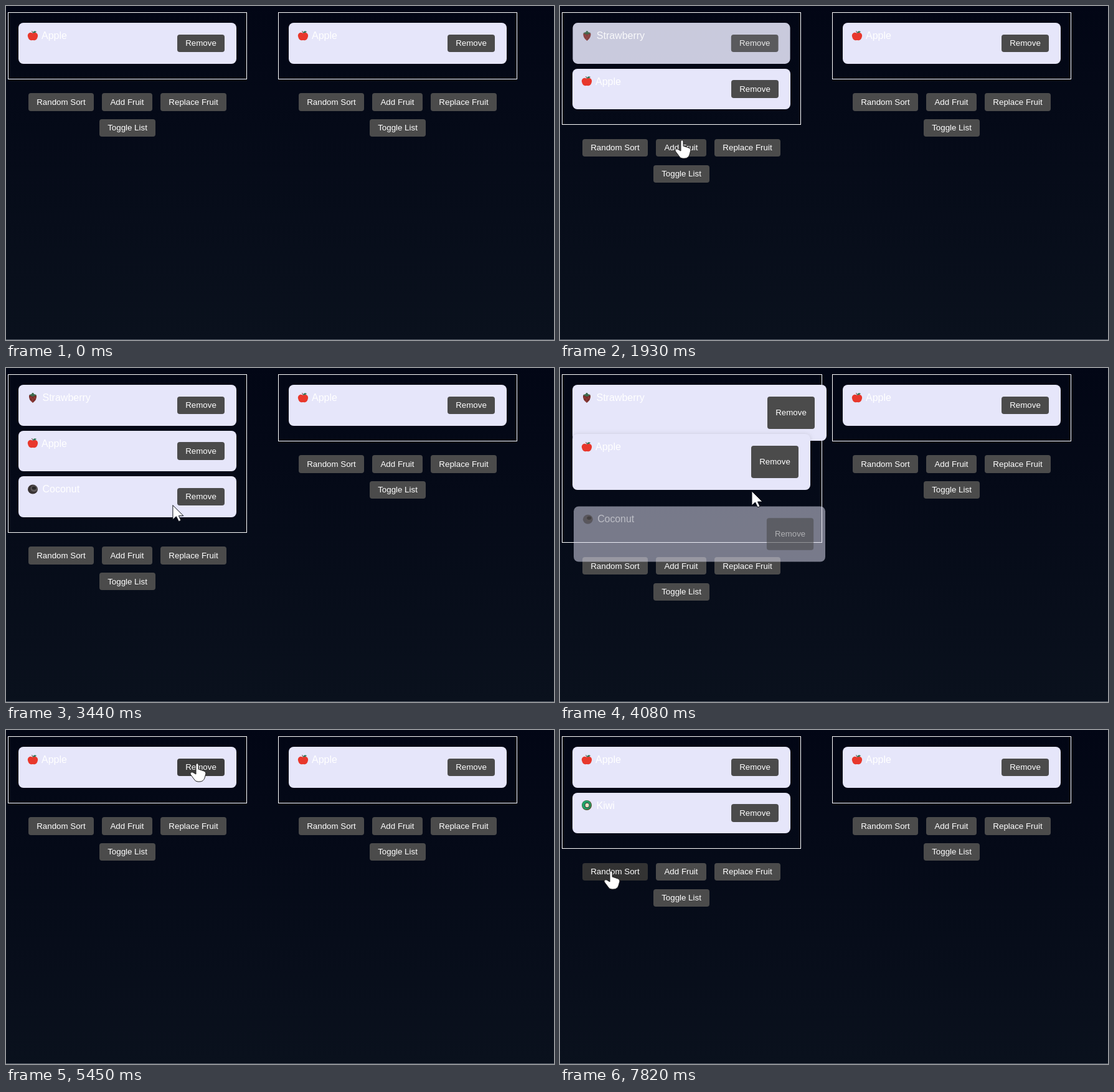
These frames come from a looping animation (880x537 px, 8 s). An HTML page with a canvas:

```html
<!DOCTYPE html>
<html lang="en">
<head>
<meta charset="utf-8">
<title>Animated fruit list</title>
<style>
  html, body { margin: 0; width: 100%; height: 100%; overflow: hidden; background: #050b17; }
  canvas { display: block; }
</style>
</head>
<body>
<canvas width="880" height="537"></canvas>
<script>
const ctx = document.querySelector('canvas').getContext('2d');
const LOOP = 8000, MOVE = 250, FADE_IN = 375;
const FONT = '"Liberation Sans", Arial, sans-serif';
const ITEM_H = 65.6, GROWN_H = 89.6, GAP = 8, FIRST_Y = 27;

// List contents after each change; "still" names an item that keeps its full width.
const steps = [
  { at: 0, list: ['Apple'] },
  { at: 1570, list: ['Strawberry', 'Apple'] },
  { at: 2510, list: ['Strawberry', 'Apple', 'Coconut'] },
  { at: 3997, list: ['Strawberry', 'Apple'], still: 'Strawberry' },
  { at: 5110, list: ['Apple'] },
  { at: 6200, list: ['Apple', 'Kiwi'] }
];
const presses = [[1460, 1570], [2390, 2510], [3930, 3997], [4960, 5110], [6090, 6200]];

// Pointer stops: time, x, y
const route = [
  [0, 797, 560], [70, 797, 537], [480, 420, 300], [780, 152, 160], [870, 164, 144],
  [1000, 177, 155], [1640, 177, 155], [1900, 193, 206], [1930, 196, 215], [2210, 190, 226],
  [2600, 190, 226], [2750, 184, 232], [3020, 186, 253], [3090, 186, 253], [3600, 305, 206],
  [3790, 308, 198], [4250, 308, 198], [4650, 307, 53], [5590, 307, 53], [5950, 200, 150],
  [6220, 200, 150], [6350, 206, 200], [6600, 205, 228], [6900, 205, 228], [7180, 300, 234],
  [7250, 300, 234], [7700, 95, 228], [7820, 82, 226], [LOOP, 82, 226]
];

const lerp = (a, b, p) => a + (b - a) * p;

// cubic-bezier(x1, 0, x2, 1)
const bezier = (x1, x2) => t => {
  if (t >= 1) return 1;
  let low = 0, high = 1;
  for (let i = 0; i < 20; i++) {
    const u = (low + high) / 2, v = 1 - u;
    if (3 * x1 * u * v * v + 3 * x2 * u * u * v + u ** 3 < t) low = u; else high = u;
  }
  return low * low * (3 - 2 * low);
};
const easeIn = bezier(.42, 1), easeOut = bezier(0, .58), easeInOut = bezier(.42, .58);

function pointerAt(t) {
  const i = Math.max(1, route.findIndex(stop => stop[0] >= t));
  const [t0, x0, y0] = route[i - 1], [t1, x1, y1] = route[i];
  const p = (t - t0) / (t1 - t0);
  return { x: lerp(x0, x1, p), y: lerp(y0, y1, p) };
}

const restY = index => FIRST_Y + index * (ITEM_H + GAP);
const restHeight = count => 34 + count * (ITEM_H + GAP);

function layoutAt(t) {
  const current = steps.findLastIndex(step => step.at <= t);
  const { at, list, still } = steps[Math.max(0, current)];
  const before = current > 0 ? steps[current - 1].list : list;
  const age = t - at, moving = current > 0 && age < MOVE;
  const p = moving ? easeInOut(age / MOVE) : 1;
  let flowY = FIRST_Y;

  const items = list.map((name, index) => {
    const item = { name, y: restY(index), w: 350, h: ITEM_H, alpha: 1, scale: 1 };
    const isNew = !before.includes(name);
    if (moving) {
      item.h = isNew ? ITEM_H : GROWN_H;
      item.w = isNew ? 384 : name === still ? 408 : lerp(374, 408, p);
      item.y = isNew ? flowY : lerp(restY(before.indexOf(name)), flowY, p);
      flowY += item.h + GAP;
    }
    if (isNew) {
      item.alpha = Math.max(0, 2 * easeIn(age / FADE_IN) - 1);
      item.scale = .98 + .02 * item.alpha;
    }
    return item;
  });

  const leaving = moving ? before.filter(name => !list.includes(name)) : [];
  for (const name of leaving) {
    const gone = easeOut(age / MOVE);
    const y = FIRST_Y + before.indexOf(name) * (GROWN_H + GAP);
    items.push({ name, y, w: 408, h: GROWN_H, alpha: 1 - gone, scale: 1 - .02 * gone, leaving: true });
  }

  const height = lerp(restHeight(before.length), restHeight(list.length), p) + (moving ? 34 : 0);
  const y = 10 + height + 22.6;
  const controls = [
    { label: 'Random Sort', x: 36, y, w: 105 },
    { label: 'Add Fruit', x: 154, y, w: 81 },
    { label: 'Replace Fruit', x: 248, y, w: 106 },
    { label: 'Toggle List', x: 150, y: y + 41.7, w: 90 }
  ].map(button => ({ ...button, id: button.label, h: 28.4 }));
  for (const item of items)
    item.button = { id: item.name, label: 'Remove', x: item.w - 75, y: item.y + 18.6, w: 76, h: item.h - 37.2 };
  return { items, controls, height, width: moving ? 418 : 384 };
}

function buttonUnderPointer(t) {
  const { x, y } = pointerAt(t), { items, controls } = layoutAt(t);
  const active = items.filter(item => !item.leaving).map(item => item.button);
  return [...controls, ...active]
    .find(b => x >= b.x && x < b.x + b.w && y >= b.y && y < b.y + b.h)?.id;
}

// Share of the last 200 ms spent over each button, for the colour fade.
function hoverAt(t) {
  const hover = {};
  for (let k = 0; k < 5; k++) {
    const id = buttonUnderPointer(Math.max(0, t - k * 40));
    if (id) hover[id] = (hover[id] || 0) + .2;
  }
  return hover;
}

function box(x, y, w, h, radius, color) {
  const left = Math.round(x), top = Math.round(y);
  ctx.fillStyle = color;
  ctx.beginPath();
  ctx.roundRect(left, top, Math.round(x + w) - left, Math.round(y + h) - top, radius);
  ctx.fill();
}

function text(value, x, y, size, align = 'left') {
  ctx.font = `${size}px ${FONT}`;
  ctx.textAlign = align;
  ctx.fillStyle = '#fff';
  ctx.fillText(value, x, y);
}

function ellipse(x, y, rx, ry, color) {
  ctx.fillStyle = color;
  ctx.beginPath();
  ctx.ellipse(x, y, rx, ry, 0, 0, 7);
  ctx.fill();
}

function shape(path, color, outline) {
  const p = new Path2D(path);
  ctx.fillStyle = color;
  ctx.fill(p);
  if (outline) {
    ctx.strokeStyle = outline;
    ctx.lineWidth = 1;
    ctx.stroke(p);
  }
}

// Icons sit around their centre.
const icons = {
  Apple() {
    shape('M0-4C4-7 9-4 8 1C7 6 4 8 1 7H-1C-4 8-7 6-8 1C-9-4-4-7 0-4Z', '#e8382c');
    shape('M0-4L-2-8L-1-8L1-4Z', '#6b4034');
    shape('M0-5Q1-9 6-7Q4-4 0-5Z', '#2f7657');
  },
  Strawberry() {
    shape('M-6-4Q0-7 6-4Q7 3 0 8Q-7 3-6-4Z', '#7b2e2b');
    shape('M-6-5L-2-6L-1-8H1L2-6L6-5L3-3L0-2L-3-3Z', '#3c6a4c');
    for (const [x, y] of [[-3, 0], [3, 0], [0, 2], [-1, 5]]) ellipse(x, y, .8, .8, '#b5584c');
  },
  Coconut() {
    ellipse(0, 0, 8, 7.5, '#3a3434');
    ellipse(2, -1, 5.5, 5, '#5e5959');
    ellipse(2, -2, 3.5, 2.8, '#2b2929');
  },
  Kiwi() {
    ellipse(0, 0, 8, 8, '#4f5a32');
    ellipse(-.5, -.5, 7, 7, '#1fa66a');
    ellipse(.5, 0, 4.2, 4.5, '#33483a');
    ellipse(.5, 0, 3, 3.3, '#e9dfc0');
  }
};

function drawButton({ id, label, x, y, w, h }, hover) {
  const shade = Math.round(lerp(75, 51, hover[id] || 0));
  box(x, y, w, h, 4, `rgb(${shade},${shade},${shade})`);
  text(label, x + w / 2, Math.round(y + h / 2 + 4.3), 13.333, 'center');
}

function drawItem({ name, y, w, h, alpha, scale, button }, hover) {
  if (alpha <= 0) return;
  const cx = 20 + w / 2, cy = y + h / 2;
  ctx.save();
  ctx.globalAlpha = alpha;
  ctx.translate(cx, cy);
  ctx.scale(scale, scale);
  ctx.translate(-cx, -cy);
  ctx.shadowColor = 'rgba(0,0,0,.12)';
  ctx.shadowBlur = 6;
  box(20, y, w, h, 8, '#e6e6fa');
  ctx.shadowColor = 'transparent';
  text(name, name === 'Apple' ? 57 : 58.5, Math.round(y + 26), 16);
  drawButton(button, hover);
  ctx.translate(43, Math.round(y + 20.5));
  icons[name]();
  ctx.restore();
}

function drawPanel({ items, controls, height, width }, hover = {}) {
  ctx.strokeStyle = '#fff';
  ctx.lineWidth = 1;
  ctx.strokeRect(3.5, 10.5, width - 1, Math.round(height + 10) - 11);
  controls.forEach(button => drawButton(button, hover));
  items.forEach(item => drawItem(item, hover));
}

function drawPointer(t) {
  const { x, y } = pointerAt(t);
  if (presses.some(([from, to]) => t >= from && t < to)) ellipse(x, y - 2, 18, 18, 'rgba(255,255,0,.5)');
  ctx.save();
  ctx.translate(x, y);
  if (buttonUnderPointer(t))
    shape('M-2 2Q0-1 2 2V10L11 13Q14 14 14 17L12 24Q10 30 4 30H1Q-3 30-5 26L-11 18Q-11 14-7 15L-2 18Z', '#fff', '#222');
  else
    shape('M0 0V23L5.5 18L9.5 26L13 24.5L9.5 17H17Z', '#fff', '#0a0f18');
  ctx.restore();
}

const backdrop = ctx.createLinearGradient(0, 0, 0, 537);
backdrop.addColorStop(0, '#020615');
backdrop.addColorStop(1, '#0a111d');

function draw(now) {
  const t = now % LOOP;
  ctx.fillStyle = backdrop;
  ctx.fillRect(0, 0, 880, 537);
  ctx.fillStyle = '#59606a';
  ctx.fillRect(0, 536, 880, 1);
  ctx.save();
  ctx.translate(434, 0);
  drawPanel(layoutAt(0));
  ctx.restore();
  drawPanel(layoutAt(t), hoverAt(t));
  drawPointer(t);
}

const start = performance.now();
function tick() {
  draw(performance.now() - start);
  requestAnimationFrame(tick);
}
tick();
</script>
</body>
</html>
```
